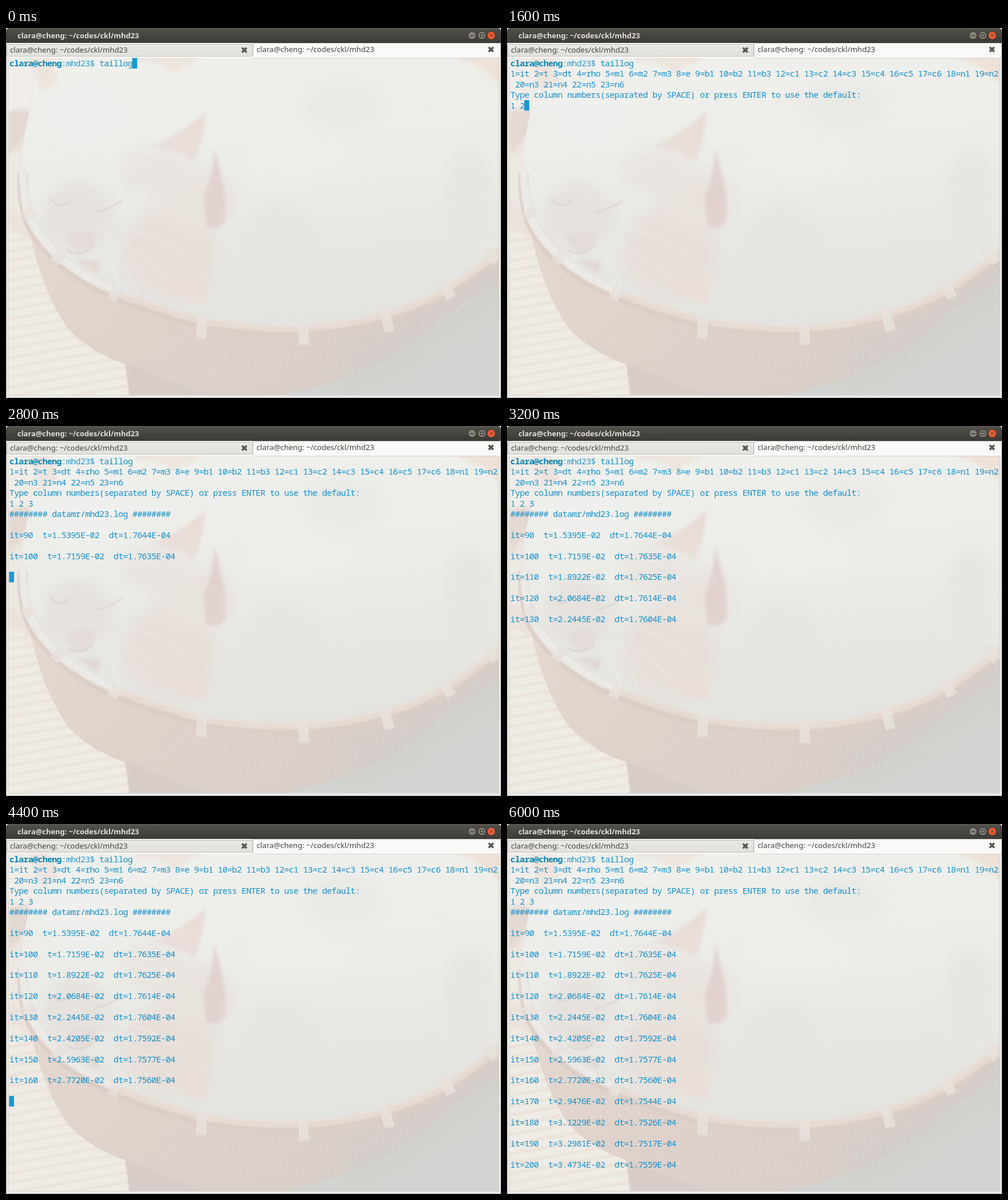
Animation, 865 px wide and 647 px high, one loop 6.4 s. Source, as an HTML page:

```html
<!DOCTYPE html>
<html lang="en">
<head>
<meta charset="utf-8">
<title>Terminal</title>
<style>
html, body { margin: 0; width: 100%; height: 100%; overflow: hidden; background: #f2f1f0; }
svg { display: block; width: 865px; height: 647px; }
.ui { font: 13.2px "Noto Sans", "Open Sans", sans-serif; fill: #45443f; }
.title { font-size: 12.9px; font-weight: 700; fill: #e2dfd7; }
.term { font: 15px "Noto Sans Mono", "DejaVu Sans Mono", monospace; letter-spacing: -.72px; fill: #1690ca; }
.term text { white-space: pre; }
.user { font-weight: 700; fill: #0786b0; }
.path { fill: #2f9bcb; }
</style>
</head>
<body>
<svg viewBox="0 0 865 647" xmlns="http://www.w3.org/2000/svg">
  <defs>
    <linearGradient id="bar" x2="0" y2="1">
      <stop stop-color="#5b5a53"/><stop offset=".12" stop-color="#504f49"/><stop offset="1" stop-color="#3b3a36"/>
    </linearGradient>
    <linearGradient id="tab" x2="0" y2="1">
      <stop stop-color="#e9e8e6"/><stop offset="1" stop-color="#e1e0dd"/>
    </linearGradient>
    <linearGradient id="fur" x1=".35" x2=".5" y2="1">
      <stop stop-color="#eff0ec"/><stop offset=".45" stop-color="#ebece8"/><stop offset="1" stop-color="#e3e3e0"/>
    </linearGradient>
    <linearGradient id="cane" x2="1" y2=".3">
      <stop stop-color="#e5d9d1"/><stop offset=".4" stop-color="#dfd2cb"/><stop offset="1" stop-color="#d6ccc7"/>
    </linearGradient>
    <linearGradient id="shade" x2="1">
      <stop stop-color="#d9cfca"/><stop offset=".45" stop-color="#d6d1cd"/><stop offset=".75" stop-color="#d1d3d0"/>
    </linearGradient>
    <linearGradient id="ear" x1="1" x2=".4" y2="1">
      <stop stop-color="#e9dbd5"/><stop offset="1" stop-color="#e9e0db"/>
    </linearGradient>
    <filter id="soft" x="-50%" y="-50%" width="200%" height="200%"><feGaussianBlur stdDeviation="14"/></filter>
    <filter id="mild" x="-50%" y="-50%" width="200%" height="200%"><feGaussianBlur stdDeviation="3"/></filter>
    <filter id="slight" x="-20%" y="-20%" width="140%" height="140%"><feGaussianBlur stdDeviation="1.2"/></filter>
    <clipPath id="pane"><rect x="4" y="52" width="857" height="590"/></clipPath>
    <clipPath id="matClip"><path d="M4 350L45 368L75 470L125 545L208 588L216 642H4Z"/></clipPath>
    <path id="rim" d="M29 245C28 320 42 350 88 395C145 445 205 470 340 508C430 524 515 526 590 514C670 500 730 478 775 450Q815 425 866 384"/>
    <path id="cross" d="M-4-4L4 4M4-4L-4 4"/>
  </defs>

  <g clip-path="url(#pane)">
    <rect width="865" height="647" fill="#ece3dd"/>
    <g filter="url(#mild)">
      <path d="M0 50H60L40 150L0 230Z" fill="#f1ede8"/>
      <path d="M4 148Q30 132 46 150L40 178L4 224Z" fill="#e4d9d2"/>
      <path d="M0 225L28 215L30 330L0 300Z" fill="#eee8e2"/>
    </g>
    <path d="M200 560H865V647H200Z" fill="url(#shade)"/>
    <path d="M865 380V647H480L640 560Z" fill="#d2d4d1"/>
    <g clip-path="url(#matClip)">
      <rect y="340" width="240" height="310" fill="#efece6"/>
      <g id="mat" stroke="#ece3da" stroke-width="6" filter="url(#slight)"></g>
    </g>
    <path d="M29 270C40 390 70 470 108 525Q150 570 215 590Q300 632 390 642H480C590 622 700 575 770 500L866 440V384L775 450L590 514L340 508L88 395Z" fill="url(#cane)"/>
    <path d="M215 588Q300 625 345 642H216Z" fill="#d7ccc7" filter="url(#mild)"/>
    <path d="M600 565Q735 530 866 405V480Q720 600 590 642Z" fill="#d1cfcb" opacity=".65" filter="url(#soft)"/>
    <g id="weave" fill="none" stroke="#eae0da" stroke-width="9" opacity=".3"></g>

    <path d="M29 245C24 190 48 145 55 60L70 50H866V384Q815 425 775 450C730 478 670 500 590 514C515 526 430 524 340 508C205 470 145 445 88 395C42 350 28 320 29 245Z" fill="url(#fur)"/>
    <g filter="url(#soft)">
      <ellipse cx="285" cy="395" rx="85" ry="80" fill="#e7dfd9"/>
      <ellipse cx="125" cy="330" rx="62" ry="62" fill="#e6e2de"/>
      <ellipse cx="330" cy="300" rx="70" ry="55" fill="#e9e3de"/>
      <ellipse cx="255" cy="250" rx="60" ry="40" fill="#e9e5e0"/>
      <ellipse cx="590" cy="135" rx="75" ry="45" fill="#e9eae6"/>
      <ellipse cx="510" cy="230" rx="85" ry="30" fill="#eeefeb"/>
      <ellipse cx="480" cy="385" rx="65" ry="75" fill="#e5e6e2"/>
      <ellipse cx="810" cy="300" rx="45" ry="90" fill="#e8e6e2"/>
      <ellipse cx="140" cy="150" rx="75" ry="65" fill="#eff0ed"/>
    </g>
    <g filter="url(#mild)">
      <path d="M38 50H78L92 95L60 112Z" fill="#eee4de"/>
      <path d="M225 48H350L292 80Q270 56 225 60Z" fill="#ede5de"/>
      <path d="M790 48H866V105Q835 65 790 55Z" fill="#eee2d8"/>
      <path d="M252 208Q305 185 349 147Q346 190 330 236Q298 212 252 208Z" fill="url(#ear)"/>
      <path d="M364 208Q376 258 382 286L384 335Q374 355 350 347L345 295Q362 262 364 208Z" fill="#e1d2cf"/>
      <path d="M275 450Q310 425 358 437L350 484Q305 474 275 450Z" fill="#eadfd8"/>
      <path d="M104 365Q130 348 158 362Q150 394 130 394Q110 386 104 365Z" fill="#e3dcd8"/>
      <path d="M120 405L165 408L160 430Z" fill="#e2d8d3"/>
    </g>
    <path d="M78 300Q96 318 112 302M155 322Q178 318 202 302M107 388Q128 402 151 383" fill="none" stroke="#dcd3ce" stroke-width="2.5" stroke-linecap="round" filter="url(#slight)"/>
    <g fill="none" stroke="#f2f2ef" stroke-width="1" opacity=".85">
      <path d="M170 272Q210 230 255 215M180 268Q225 238 258 236M190 375Q245 395 284 440M184 382Q232 410 255 455M178 388Q218 420 230 465M172 390Q194 425 198 455M200 350Q260 358 312 395"/>
    </g>

    <g fill="none" filter="url(#slight)">
      <use href="#rim" y="9" stroke="#dbcec7" stroke-width="18"/>
      <use href="#rim" y="3" stroke="#e6dbd3" stroke-width="13"/>
      <use href="#rim" y="-2" stroke="#e9e2dc" stroke-width="3"/>
      <path d="M30 245C29 320 43 350 88 395C125 428 150 442 195 460" stroke="#eceae7" stroke-width="13"/>
      <path d="M36 255C36 315 55 350 94 390Q135 427 195 454" stroke="#e3dfdb" stroke-width="2"/>
    </g>
    <g id="ties" stroke="#e8e1dc" stroke-linecap="round" filter="url(#slight)"></g>
  </g>

  <rect width="865" height="26" fill="url(#bar)"/>
  <path d="M0 0H4Q1 1 0 4ZM865 0H861Q864 1 865 4Z" fill="#fff"/>
  <path d="M0 25.5H865" stroke="#33322e"/>
  <text class="ui title" x="20" y="17.5">clara@cheng: ~/codes/ckl/mhd23</text>
  <g stroke="#34332f">
    <circle cx="814.5" cy="13" r="6.8" fill="#87847b"/>
    <circle cx="831.5" cy="13" r="6.8" fill="#87847b"/>
    <circle cx="848" cy="13" r="7.2" fill="#ed5c34"/>
  </g>
  <g fill="none" stroke="#3b3a36" stroke-width="1.3">
    <path d="M811 13.5H818"/>
    <rect x="828.7" y="10.5" width="5.5" height="5"/>
    <use href="#cross" transform="translate(848 13) scale(.65)"/>
  </g>

  <rect y="26" width="865" height="26" fill="#f2f1f0"/>
  <path d="M1.5 50V31Q1.5 28.5 4 28.5H431V50Z" fill="url(#tab)" stroke="#c3c0bb"/>
  <path d="M431.5 52V29Q431.5 26.5 434 26.5H862Q864.5 26.5 864.5 29V52Z" fill="#faf9f8" stroke="#bbb8b3"/>
  <path d="M2 49.5H431" stroke="#c4c1bc"/>
  <path d="M2 51H864" stroke="#fbfaf9" stroke-width="2"/>
  <text class="ui" x="7" y="43">clara@cheng: ~/codes/ckl/mhd23</text>
  <text class="ui" x="438" y="42">clara@cheng: ~/codes/ckl/mhd23</text>
  <g stroke="#585651" stroke-width="3.6">
    <use href="#cross" x="416.5" y="38.5"/>
    <use href="#cross" x="847.5" y="37.5"/>
  </g>
  <path d="M.5 26V646.5H864.5V26" fill="none" stroke="#aaa7a1"/>
  <path d="M3.5 52V643H861.5V52" fill="none" stroke="#d5d2ce"/>

  <g class="term" id="term">
    <text x="5.7" y="67"><tspan class="user">clara@cheng</tspan><tspan class="path">:mhd23$ </tspan>taillog</text>
  </g>
</svg>
<script>
const NS = "http://www.w3.org/2000/svg";
const LOOP = 6400, CELL = 8.28, ROW = 18.4, LEFT = 5.7;
const byId = id => document.getElementById(id);

function add(parent, tag, attrs, text = "") {
  const el = document.createElementNS(NS, tag);
  for (const k in attrs) el.setAttribute(k, attrs[k]);
  el.textContent = text;
  parent.append(el);
  return el;
}

// Backdrop: mat stripes, cane weave and the ties around the rim
for (let y = 340; y < 720; y += 17)
  add(byId("mat"), "path", { d: `M0 ${y}L240 ${y - 42}` });

for (let i = 0; i < 4; i++)
  add(byId("weave"), "use", {
    href: "#rim", y: 30 + i * 20, "stroke-dasharray": "2 9", "stroke-dashoffset": i * 4
  });

// Ties: x, y, turn, length
const ties = [
  [40, 325, 62, 18], [91, 401, 40, 19], [190, 464, 25, 20], [342, 524, 3, 36],
  [520, 534, -3, 36], [665, 510, -15, 38], [770, 457, -30, 30], [847, 397, -35, 28]
];
for (const [x, y, turn, size] of ties) {
  const g = add(byId("ties"), "g", { transform: `translate(${x} ${y}) rotate(${turn})` });
  for (const dx of [-6, 0, 6])
    add(g, "path", { d: `M${dx} ${-size / 2}V${size / 2}`, "stroke-width": 5 });
}

// Terminal output: start time, row, column, text
const lines = [
  [400, 1, 0, "1=it 2=t 3=dt 4=rho 5=m1 6=m2 7=m3 8=e 9=b1 10=b2 11=b3 12=c1 13=c2 14=c3 15=c4 16=c5 17=c6 18=n1 19=n2"],
  [400, 2, 1, "20=n3 21=n4 22=n5 23=n6"],
  [400, 3, 0, "Type column numbers(separated by SPACE) or press ENTER to use the default:"],
  [800, 4, 0, "1"],
  [1600, 4, 2, "2"],
  [2400, 4, 4, "3"],
  [2800, 5, 0, "######## datamr/mhd23.log ########"]
];

// Log entries: start time, t, dt
const log = [
  [2800, "1.5395", "1.7644"], [2800, "1.7159", "1.7635"],
  [3200, "1.8922", "1.7625"], [3200, "2.0684", "1.7614"], [3200, "2.2445", "1.7604"],
  [3600, "2.4205", "1.7592"], [4000, "2.5963", "1.7577"], [4400, "2.7720", "1.7560"],
  [4800, "2.9476", "1.7544"], [5200, "3.1229", "1.7526"], [5600, "3.2981", "1.7517"],
  [6000, "3.4734", "1.7559"]
];
log.forEach(([at, t, dt], i) =>
  lines.push([at, 7 + 2 * i, 0, `it=${90 + 10 * i}  t=${t}E-02  dt=${dt}E-04`]));

// Cursor: start, end, row, column
const cursors = [[0, 400, 0, 26], [1600, 2000, 4, 3], [2800, 3200, 11, 0], [4400, 4800, 23, 0]];

const term = byId("term");
const parts = lines.map(([from, row, col, text]) => ({
  from, to: LOOP,
  el: add(term, "text", { x: LEFT + col * CELL, y: 67 + row * ROW }, text)
}));
for (const [from, to, row, col] of cursors)
  parts.push({
    from, to,
    el: add(term, "rect", {
      x: LEFT - .3 + col * CELL, y: 52.4 + row * ROW, width: 8.6, height: 18.5, fill: "#1897d3"
    })
  });

const start = performance.now();
function draw() {
  const t = (performance.now() - start) % LOOP;
  for (const p of parts)
    p.el.style.visibility = t >= p.from && t < p.to ? "visible" : "hidden";
  requestAnimationFrame(draw);
}
draw();
</script>
</body>
</html>
```
